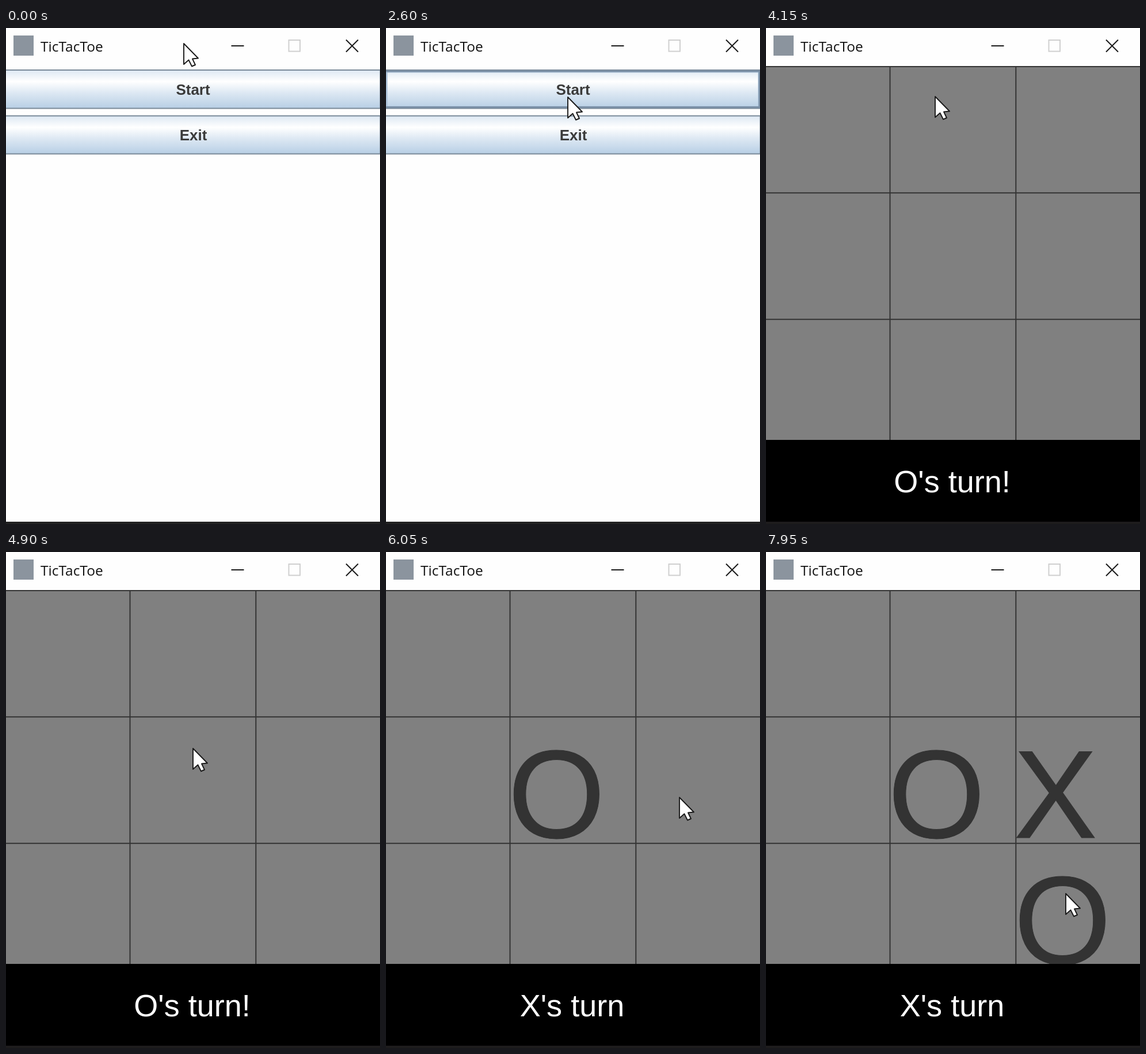
Write an HTML page that moves like this. It is 650x861 px and loops after 8 s.

```html
<!DOCTYPE html>
<html lang="en">
<head>
<meta charset="utf-8">
<title>TicTacToe</title>
<style>
  html, body { margin: 0; width: 100%; height: 100%; overflow: hidden; background: #fefefe; }
  svg { display: block; width: 650px; height: 861px; }
  text { font-family: "Liberation Sans", Arial, sans-serif; }
  .title { font: 24.5px "Open Sans", "Noto Sans", sans-serif; fill: #111; }
  .label { font-size: 26px; font-weight: bold; fill: #3a3a3a; text-anchor: middle; }
  .mark { font-size: 217px; fill: #333; stroke: #333; stroke-width: 1; text-anchor: middle; }
  .status { font-size: 54px; fill: #fff; text-anchor: middle; }
  .line { fill: none; stroke: #333; stroke-width: 2; }
  .edge { fill: none; stroke: #7a8a99; stroke-width: 2; }
</style>
</head>
<body>
<svg viewBox="0 0 650 861">
  <defs>
    <linearGradient id="metal" x1="0" y1="0" x2="0" y2="1">
      <stop offset="0" stop-color="#dde8f3"/>
      <stop offset=".3" stop-color="#fff"/>
      <stop offset=".6" stop-color="#dde8f3"/>
      <stop offset="1" stop-color="#b8cfe5"/>
    </linearGradient>
  </defs>
  <rect width="650" height="861" fill="#fefefe"/>

  <g id="menu">
    <rect y="73" width="650" height="66" fill="url(#metal)"/>
    <rect class="edge" x="-2" y="73" width="652.500" height="66.500"/>
    <g id="hover" fill="none">
      <rect x="1" y="76" width="647" height="61" stroke="#a9c0d8" stroke-width="3"/>
      <path d="M0 75H649V137.500H0" stroke="#7a8fa6" stroke-width="3"/>
    </g>
    <g id="press">
      <rect class="edge" x="-2" y="73.500" width="654" height="66" style="fill:#b6cce4"/>
      <rect x="292.500" y="87" width="63" height="37" fill="none" stroke="#a3b8cc" stroke-width="2"/>
    </g>
    <text class="label" x="325" y="116">Start</text>
    <rect y="153" width="650" height="65" fill="url(#metal)"/>
    <rect class="edge" x="-2" y="152.500" width="652.500" height="66"/>
    <text class="label" x="325.500" y="195">Exit</text>
    <rect y="857" width="650" height="4" fill="#222"/>
  </g>

  <g id="board">
    <rect y="67" width="650" height="650" fill="#808080"/>
    <path class="line" d="M0 67H650M0 286.300H650M0 505.700H650M215.500 67V716M434.300 67V716"/>
    <g id="marks"></g>
    <rect y="715" width="650" height="146" fill="#000"/>
    <rect y="857" width="650" height="4" fill="#1e1c1d"/>
    <text id="status" class="status" x="323.500" y="805.500"></text>
  </g>

  <rect x="13" y="13" width="35" height="35" fill="#8b949e"/>
  <text class="title" x="60" y="41">TicTacToe</text>
  <g fill="none" stroke="#1a1a1a" stroke-width="2">
    <path d="M391.500 31H413.500M591 20.500L612 41.500M612 20.500L591 41.500"/>
    <rect x="491.500" y="21" width="19.500" height="19.500" stroke="#cfcfcf"/>
  </g>

  <path id="cursor" d="M0 0V36L8.500 28.500L14 39.500L20 37L15 26.500L25 25.500Z"
        fill="#fff" stroke="#1a1a1a" stroke-width="1.900" stroke-linejoin="round"/>
</svg>
<script>
  const LOOP = 8000, STEP = 50;
  const HOVER = 2100, PRESS = 4000, PLAY = 4150;

  // time, x, y of the pointer tip
  const path = [
    [0, 309, 27], [1800, 309, 27], [2350, 313, 107], [2500, 313, 107],
    [2600, 316, 120], [2900, 316, 120], [3300, 320, 123], [3700, 306, 122],
    [4000, 294, 119], [4350, 294, 119], [5150, 334, 408], [5250, 336, 410],
    [5450, 342, 413], [6000, 510, 425], [6300, 514, 432], [6750, 535, 541],
    [7150, 532, 604], [7700, 521, 593], [8000, 521, 593]
  ];

  // time, letter, centre x, baseline, next status
  const moves = [
    [5250, "O", 296.5, 495.5, "X's turn"],
    [6250, "X", 503, 495.5, "O's turn"],
    [7250, "O", 515.5, 714.5, "X's turn"]
  ];

  const $ = id => document.getElementById(id);
  const show = (el, on) => el.style.display = on ? "" : "none";

  const marks = moves.map(([, letter, x, y]) => {
    const el = document.createElementNS("http://www.w3.org/2000/svg", "text");
    el.setAttribute("class", "mark");
    el.setAttribute("x", x);
    el.setAttribute("y", y);
    el.textContent = letter;
    return $("marks").appendChild(el);
  });

  function pointer(t) {
    const i = path.findIndex(p => p[0] > t);
    const [t0, x0, y0] = path[i - 1], [t1, x1, y1] = path[i];
    const u = (t - t0) / (t1 - t0), k = u * u * (3 - 2 * u);
    return [x0 + (x1 - x0) * k, y0 + (y1 - y0) * k];
  }

  function draw(t) {
    show($("menu"), t < PLAY);
    show($("board"), t >= PLAY);
    show($("hover"), t >= HOVER && t < PRESS);
    show($("press"), t >= PRESS);
    let status = "O's turn!";
    moves.forEach((m, i) => {
      show(marks[i], t >= m[0]);
      if (t >= m[0]) status = m[4];
    });
    $("status").textContent = status;
    $("cursor").setAttribute("transform", `translate(${pointer(t).map(Math.round)})`);
  }

  function tick() {
    const t = performance.now() % LOOP;
    draw(Math.floor(t / STEP) * STEP);
    requestAnimationFrame(tick);
  }
  tick();
</script>
</body>
</html>
```
